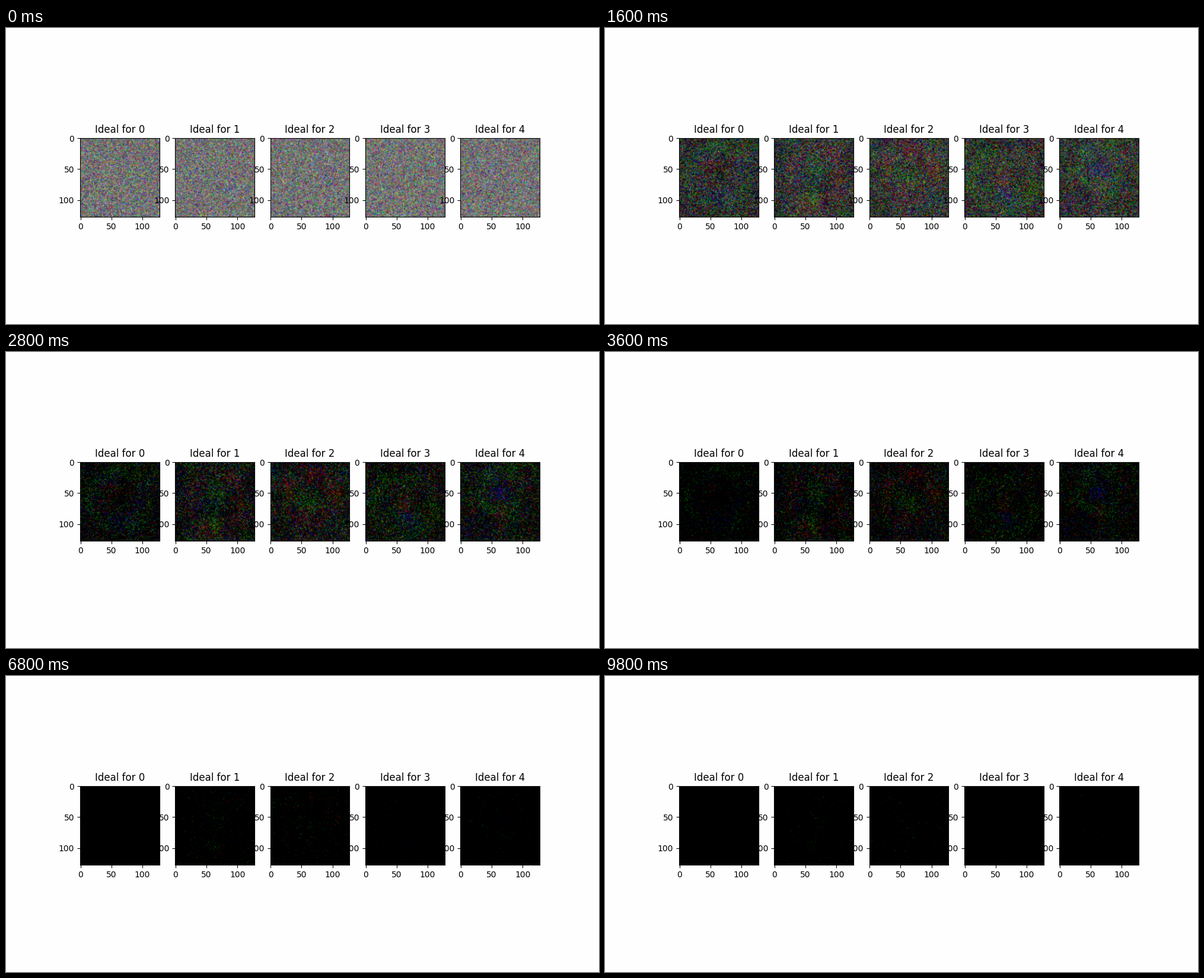
These frames come from a looping animation (1000 by 500 pixels, 10000 ms). A matplotlib script:

```python
import numpy as np
import matplotlib.pyplot as plt
from matplotlib.animation import FuncAnimation

SIZE, PANELS, FRAMES, INTERVAL = 128, 5, 50, 200
SPAN = 5  # frames between two independent noise fields

# How much further each panel sinks into black
FADE = [.5, 0, 0, .25, .12]

# Rings and spots that emerge: channel, centre x, centre y, ring radius
SPOTS = [
    [("g", 62, 62, 48), ("b", 62, 62, 32), ("r", 60, 45, 0)],
    [("g", 66, 53, 0), ("g", 64, 99, 0), ("r", 66, 62, 42)],
    [("g", 65, 66, 0), ("r", 66, 60, 40)],
    [("g", 62, 72, 50), ("b", 64, 92, 0), ("r", 62, 68, 0)],
    [("g", 64, 48, 34), ("b", 62, 48, 0), ("r", 66, 80, 0)],
]

rng = np.random.default_rng(7)
yy, xx = np.mgrid[:SIZE, :SIZE]
freq = 2 * np.pi * np.fft.fftfreq(SIZE)


def grain(size):
    """Soft colour noise with unit spread."""
    blur = np.exp(-((freq[None, :] ** 2 + freq[:, None] ** 2) * size ** 2) / 2)
    raw = rng.standard_normal((3, SIZE, SIZE))
    soft = np.fft.ifft2(np.fft.fft2(raw) * blur).real
    return np.moveaxis(soft / soft.std(), 0, -1)


def pattern(spots):
    """Faint blotches with the coloured rings and spots on top."""
    out = .025 * grain(9)
    for channel, cx, cy, radius in spots:
        dist = np.hypot(xx - cx, yy - cy)
        width = 10 if radius else 15
        strength = .08 if radius else .15
        out[..., "rgb".index(channel)] += strength * np.exp(-((dist - radius) / width) ** 2)
    return out


steady = [grain(.6) for _ in range(PANELS)]
drifting = [[grain(.6) for _ in range(FRAMES // SPAN + 1)] for _ in range(PANELS)]
patterns = [pattern(s) for s in SPOTS]


def picture(panel, frame):
    # Cross-fade neighbouring fields at constant spread
    knot, step = divmod(frame, SPAN)
    angle = step / SPAN * np.pi / 2
    fields = drifting[panel]
    moving = np.cos(angle) * fields[knot] + np.sin(angle) * fields[knot + 1]
    noise = .65 * steady[panel] + .76 * moving

    u = frame / (FRAMES - 1)
    sink = np.tanh(2 * u)
    level = .45 - .75 * sink - FADE[panel] * u ** 1.5
    tint = .07 * u * np.array([1, 0, 1])
    spread = .105 + .03 * sink
    rgb = level - tint + spread * noise + np.tanh(6 * u) * patterns[panel]
    return np.clip(rgb, 0, 1)


fig, axes = plt.subplots(1, PANELS, figsize=(10, 5), dpi=100, facecolor="#fefefe")
images = []
for i, ax in enumerate(axes):
    images.append(ax.imshow(picture(i, 0)))
    ax.set_title(f"Ideal for {i}")


def update(frame):
    for i, image in enumerate(images):
        image.set_data(picture(i, frame))
    return images


anim = FuncAnimation(fig, update, frames=FRAMES, interval=INTERVAL,
                     repeat=True, repeat_delay=0, blit=False)
plt.show()
```
